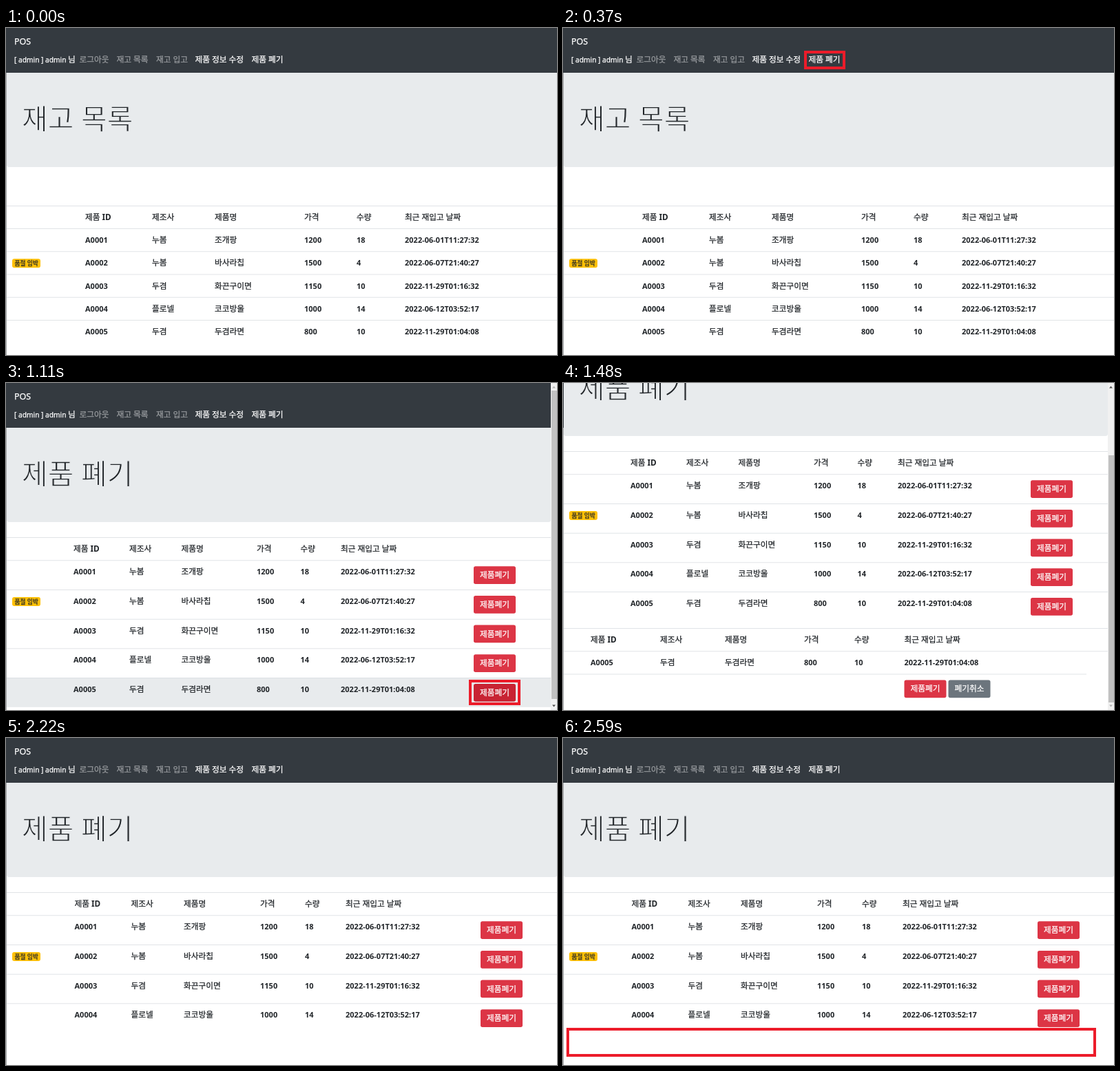
Write an HTML page that moves like this. It is 800 px wide and 475 px high and loops after 2.96 s.

```html
<!DOCTYPE html>
<html lang="ko">
<head>
<meta charset="utf-8">
<title>POS</title>
<style>
  html, body { margin: 0; width: 100%; height: 100%; overflow: hidden; background: #fff; }
  svg { display: block; font-family: "Noto Sans", "Noto Sans CJK KR", sans-serif; }
  text { white-space: pre; }
  .medium { stroke: currentColor; stroke-width: .25; }
  .bold { font-weight: 700; stroke: none; }
  .thin { font-weight: 300; stroke: #e8ebed; stroke-width: 1.3; }
</style>
</head>
<body>
<svg id="stage" width="800" height="475" viewBox="0 0 800 475"></svg>
<script>
const STEP = 370, LOOP = 2960;
const INK = '#212529', RED = '#dc3545', RED_HOVER = '#c82333', GRAY = '#6c757d';
const PALE = '#e8ebed', LINE = '#d9dde1', MARK = '#ec1c2a', NAV = '#343a40';

// The page is shown at this zoom; row heights follow from its CSS pixels.
const ZOOM = 0.6775;
const ROW = 49 * ZOOM, BUTTON_ROW = 63 * ZOOM, TEXT_MIDDLE = 25 * ZOOM;
const BUTTON_TOP = 13 * ZOOM, BUTTON_HEIGHT = 38 * ZOOM;

const HEADERS = ['제품 ID', '제조사', '제품명', '가격', '수량', '최근 재입고 날짜'];
const PRODUCTS = [
  ['A0001', '누봄', '조개팡', '1200', '18', '2022-06-01T11:27:32'],
  ['A0002', '누봄', '바사라칩', '1500', '4', '2022-06-07T21:40:27'],
  ['A0003', '두겸', '화끈구이면', '1150', '10', '2022-11-29T01:16:32'],
  ['A0004', '플로넬', '코코방울', '1000', '14', '2022-06-12T03:52:17'],
  ['A0005', '두겸', '두겸라면', '800', '10', '2022-11-29T01:04:08']
];
const LIST_COLS = [115, 212, 303, 433, 509, 579];
const DISCARD_COLS = [98, 179, 254.5, 364, 427.5, 486];
const WIDE_COLS = [99.5, 181.5, 258, 369, 434, 493];
const CONFIRM_COLS = [40, 141, 235, 350, 423, 495.5];

const rect = (x, y, w, h, fill, r = 0) =>
  `<rect x="${x}" y="${y}" width="${w}" height="${h}" rx="${r}" fill="${fill}"/>`;
const text = (x, y, s, size, fill = INK, style = 'medium') =>
  `<text class="${style}" x="${x}" y="${y}" font-size="${size}" fill="${fill}" color="${fill}">${s}</text>`;
const label = (x, middle, s, fill) => text(x, middle + 4, s, 11.7, fill);
const rule = (y, width) => rect(0, y, width, 0.8, LINE);
const button = (x, y, s, fill = RED) =>
  rect(x, y, 61, BUTTON_HEIGHT, fill, 2.7) + label(x + 9, y + 13, s, '#fff');
const mark = (x, y, w, h) =>
  `<rect x="${x + 2}" y="${y + 2}" width="${w - 4}" height="${h - 4}" fill="none" stroke="${MARK}" stroke-width="4"/>`;

// Hangul is medium, Latin letters and digits are bold.
const cell = (x, middle, s) => /[가-힣]/.test(s)
  ? label(x, middle, s.replace(/[A-Z]+/, '<tspan class="bold">$&</tspan>'))
  : text(x, middle + 4, s, 11, INK, 'bold');
const cells = (cols, values, middle) =>
  values.map((value, i) => cell(cols[i], middle, value)).join('');

function header(title, width) {
  const faded = '#999c9f';
  return rect(0, 0, width, 65, NAV) +
    text(12, 24, 'POS', 12.5, '#fff') +
    text(12, 50, '[ admin ] admin', 10.2, '#fff') +
    label(90, 46, '님', '#fff') +
    label(106.5, 46, '로그아웃', faded) +
    label(160.5, 46, '재고 목록', faded) +
    label(218, 46, '재고 입고', faded) +
    label(274.5, 46, '제품 정보 수정', '#fff') +
    label(356.5, 46, '제품 폐기', '#fff') +
    rect(1, 65, width - 1, 137, PALE, 3.3) + rect(1, 65, width - 1, 10, PALE) +
    text(23, 146.5, title, 41, INK, 'thin');
}

function table({ cols, top, pitch, width, count = 5, buttonX, hovered }) {
  let out = rule(top, width) + cells(cols, HEADERS, top + TEXT_MIDDLE);
  PRODUCTS.slice(0, count).forEach((product, i) => {
    const y = top + ROW + pitch * i, middle = y + TEXT_MIDDLE;
    if (i === hovered) out += rect(1, y, width - 1, pitch, PALE);
    out += rule(y, width) + cells(cols, product, middle);
    if (i === 1) {
      out += rect(9, middle - 6, 41, 13, '#ffc107', 3) +
        text(12.5, middle + 4, '품절 임박', 8.7);
    }
    if (buttonX) out += button(buttonX, y + BUTTON_TOP, '제품폐기', i === hovered ? RED_HOVER : RED);
  });
  return out;
}

function scrollbar(thumbTop, thumbHeight, atTop) {
  const dark = '#505050', light = '#b5b5b5';
  return rect(791, 0, 9, 475, '#f1f1f1') +
    rect(792, thumbTop, 8, thumbHeight, '#c1c1c1') +
    `<path d="M793 7.5l2.5-3 2.5 3z" fill="${atTop ? light : dark}"/>` +
    `<path d="M793 467.5l2.5 3 2.5-3z" fill="${atTop ? dark : light}"/>`;
}

function listPage() {
  return header('재고 목록', 800) + table({ cols: LIST_COLS, top: 258, pitch: ROW, width: 800 });
}

function discardRows(hovered) {
  return header('제품 폐기', 791) +
    table({ cols: DISCARD_COLS, top: 224.2, pitch: BUTTON_ROW, width: 791, buttonX: 679, hovered });
}

function discardPage(hovered) {
  return discardRows(hovered) + scrollbar(11, 448, true);
}

function confirmPage(hover) {
  const top = 356.2, row = top + ROW, actions = row + ROW;
  return `<g transform="translate(0 -125)">${discardRows()}</g>` +
    rule(top, 791) + cells(CONFIRM_COLS, HEADERS, top + TEXT_MIDDLE) +
    rule(row, 791) + cells(CONFIRM_COLS, PRODUCTS[4], row + TEXT_MIDDLE) +
    (hover ? rect(1, actions, 759, BUTTON_ROW, PALE) : '') + rule(actions, 760) +
    button(495.5, actions + BUTTON_TOP, '제품폐기', hover ? RED_HOVER : RED) +
    button(559.5, actions + BUTTON_TOP, '폐기취소', GRAY) +
    scrollbar(105, 359, false);
}

function discardedPage() {
  return header('제품 폐기', 800) +
    table({ cols: WIDE_COLS, top: 224.2, pitch: BUTTON_ROW, width: 800, count: 4, buttonX: 689 });
}

const scenes = [
  () => listPage(),
  () => listPage() + mark(350, 33, 60, 27),
  () => discardPage(),
  () => discardPage(4) + mark(672, 431, 75, 37),
  () => confirmPage(false),
  () => confirmPage(true) + mark(489, 425, 74, 37),
  () => discardedPage(),
  () => discardedPage() + mark(5, 421, 769, 42)
];

const stage = document.getElementById('stage');
const windowEdge = rect(0, 0, 1, 65, NAV) + rect(0, 65, 1, 410, '#a5a7a9');
let shown = -1;

function tick() {
  const scene = Math.floor(performance.now() % LOOP / STEP);
  if (scene !== shown) {
    shown = scene;
    stage.innerHTML = scenes[scene]() + windowEdge;
  }
  requestAnimationFrame(tick);
}
tick();
</script>
</body>
</html>
```
